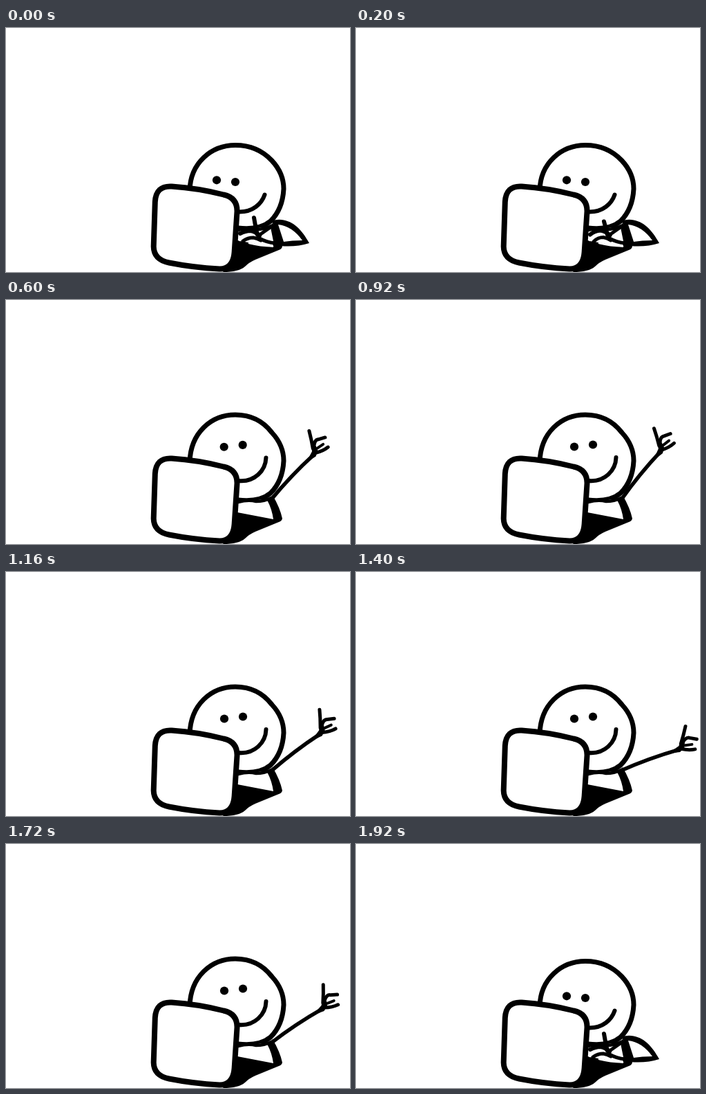
Recreate the animation shown at these times as an HTML page with a canvas. Size 498 px wide and 355 px high, loop 1960 ms.

```html
<!DOCTYPE html>
<html lang="en">
<head>
<meta charset="utf-8">
<title>Waving at the desk</title>
<style>
  html, body { margin: 0; width: 100%; height: 100%; overflow: hidden; background: #fff; }
  canvas { display: block; width: 498px; height: 355px; }
</style>
</head>
<body>
<canvas id="stage" width="498" height="355"></canvas>
<script>
const ctx = document.getElementById('stage').getContext('2d');
const INK = '#000', PAPER = '#fff';
const STEP = 40, LOOP = 1960;
const WAVE_IN = 12, WAVE_OUT = 46;
const SHOULDER = [386, 288];

// Turning points of the arm: [step, degrees above horizontal]
const SWING = [[12, 12], [16, 51], [20, 22], [23.5, 51], [27, 21],
               [31, 51], [35.2, 18.5], [40.3, 51], [45.4, 17], [47, 17]];

const clamp = x => Math.max(0, Math.min(1, x));
const ease = x => (1 - Math.cos(Math.PI * clamp(x))) / 2;
const mix = (a, b, p) => a + (b - a) * p;

function line(d, width, color = INK) {
  ctx.strokeStyle = color;
  ctx.lineWidth = width;
  ctx.stroke(new Path2D(d));
}

function shape(d, color = INK) {
  ctx.fillStyle = color;
  ctx.fill(new Path2D(d));
}

function dot(x, y, r) {
  ctx.fillStyle = INK;
  ctx.beginPath();
  ctx.arc(x, y, r, 0, Math.PI * 2);
  ctx.fill();
}

// Curve of two quadratic pieces, blended between two poses
function bend(a, b, p, width) {
  const v = a.map((n, i) => mix(n, b[i], p));
  line(`M${v.slice(0, 2)} Q${v.slice(2, 6)} Q${v.slice(6)}`, width);
}

function swingAngle(step) {
  let i = 0;
  while (i < SWING.length - 2 && step > SWING[i + 1][0]) i++;
  const [t0, a0] = SWING[i], [t1, a1] = SWING[i + 1];
  return mix(a0, a1, ease((step - t0) / (t1 - t0))) * Math.PI / 180;
}

// up: 0 looks at the screen, 1 looks up
function head(up) {
  const at = (a, b) => mix(a, b, up);
  const top = at(170.5, 167);
  const d = `M266 236 C267 ${top + 26} 297 ${top} 332 ${top}
             C354 ${top} 372 ${at(179, 176)} 385 193 C397 206 402 219 402 234
             C401 254 394 270 383 281 C371 291 353 293 336 291`;
  shape(d, PAPER);
  line(d, 7);

  dot(at(305, 316), at(221.3, 213.5), 6.1);
  dot(at(332, 343), at(224, 210.5), 6.1);

  line(`M${at(374.5, 376.5)} ${at(242.5, 229)} C${at(370, 376)} ${at(256, 248)}
        ${at(357, 360)} ${at(268, 265)} 337 ${at(267.5, 263)}`, 6);
}

function body() {
  shape('M336 294 L384 289 L393 318 L336 311Z', PAPER);
  line('M336 294 Q351 290 362 293 Q374 293 384 288', 4.5);
  shape('M335 309 L387 319 Q385 304 378 291 L386 284 Q397 303 400 318 Q399 322 395 323 L361 337 Q352 341 346 347 Q337 355 314 355 L329 338Z');
}

function elbow() {
  shape('M385 281 Q391 278 399 279 C416 281 428 293 439 313 Q420 319 397 317Z');
  shape('M394 286 Q414 288 429 309 Q414 309 402 311Z', PAPER);
}

// down: 0 finger raised, 1 hand curled on the keys
function typingHand(down) {
  shape('M337 300 Q352 289 364 300 L383 290 L388 315 L349 311 L337 310Z', PAPER);
  line('M352 313 Q368 317 386 317.5', 2.5, PAPER);
  line('M367 301 L384 289', 5);
  line('M367 306 Q377 312 390 313', 5);
  bend([339, 299, 347, 295, 354, 295, 361, 296, 367, 302],
       [339, 308, 340, 293, 353, 292, 364, 292, 370, 300], down, 6);
  bend([343, 310, 350, 305, 358, 305, 364, 306, 369, 309],
       [349, 314, 351, 302, 358, 302, 364, 303, 368, 308], down, 5);
  if (down < 0.5) line(`M359 ${mix(276, 292, down * 2)} Q361 289 364 301`, 6);
}

function wavingArm(angle) {
  ctx.save();
  ctx.translate(...SHOULDER);
  ctx.rotate(-angle);
  line('M-2 0 Q42 -4 86 -2', 5.5);
  shape('M78 -4 L88 -7 L94 -13 L98 -9 L95 -2 L87 2 L78 0Z');
  line('M92 -9 Q100 -20 106.5 -31', 5);
  line('M93 -8 Q102 -17 107 -13 L116 -8', 5);
  line('M90 -2 Q100 4 109 5', 5);
  line('M97 -5 L107 -3', 4);
  ctx.restore();
}

function monitor() {
  const d = `M240 230.5 Q278 233 315 242.5 Q335 247 334.5 267 L330.5 328 Q328 351 309 350.5
             Q271 348.5 236 341.5 Q214 337 213.7 318 L215.8 253 Q217 229 240 230.5Z`;
  shape(d, PAPER);
  line(d, 8);
}

function draw(step) {
  ctx.fillStyle = PAPER;
  ctx.fillRect(0, 0, 498, 355);
  ctx.lineCap = ctx.lineJoin = 'round';

  const waving = step >= WAVE_IN && step < WAVE_OUT;
  const up = ease((step - 11) / 4.5) * (1 - ease((step - 44) / 3));

  if (!waving) elbow();
  head(up);
  body();
  if (waving) {
    wavingArm(swingAngle(step));
  } else {
    const down = step < WAVE_IN ? (1 - Math.cos(step * STEP / 88 * Math.PI)) / 2 : 0;
    typingHand(down);
  }
  monitor();
}

const start = performance.now();
function tick() {
  const t = (performance.now() - start) % LOOP;
  draw(Math.floor(t / STEP));
  requestAnimationFrame(tick);
}
tick();
</script>
</body>
</html>
```
